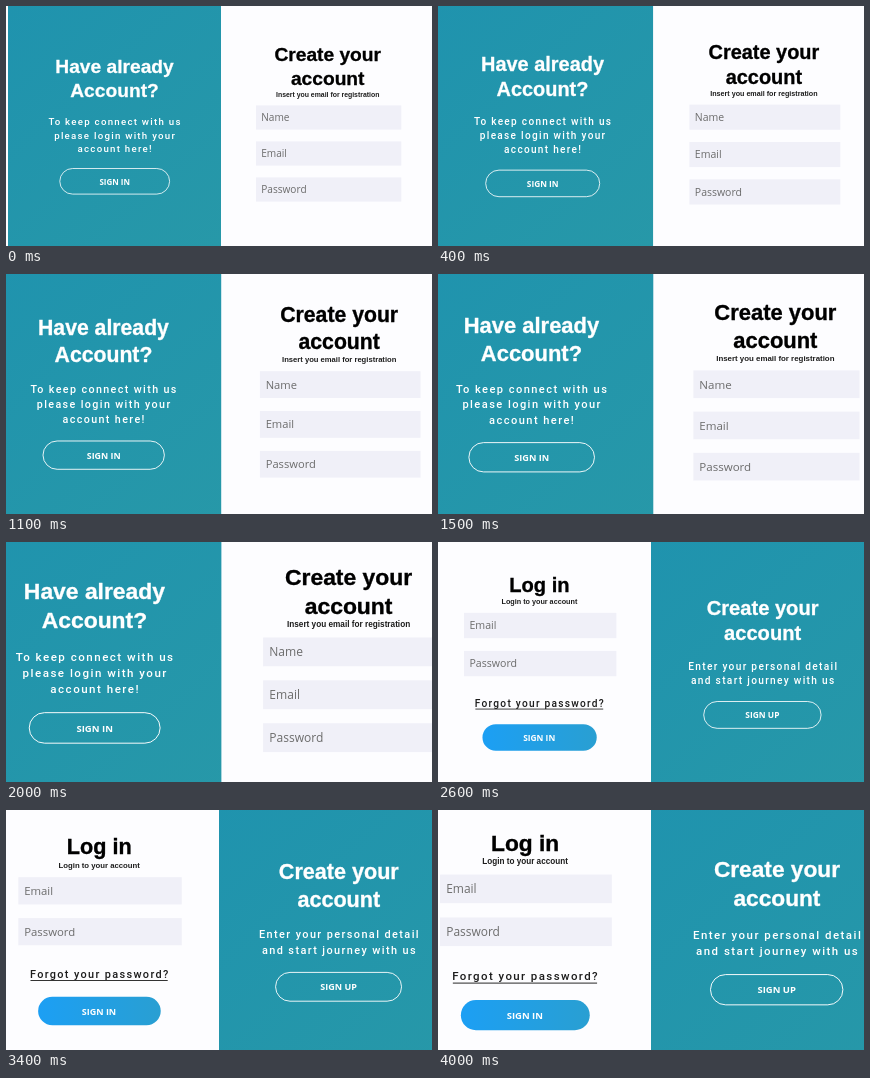
These frames come from a looping animation (426 by 240 pixels, 4.1 s). An HTML page with a canvas:

```html
<!DOCTYPE html>
<html lang="en">
<head>
<meta charset="utf-8">
<title>Login and registration</title>
<style>
  html, body { margin: 0; width: 100%; height: 100%; overflow: hidden; background: #fdfdff; }
  canvas { display: block; }
</style>
</head>
<body>
<canvas id="stage" width="426" height="240"></canvas>
<script>
const ctx = document.getElementById('stage').getContext('2d');
const W = 426, H = 240;
const LOOP = 4100, SWITCH = 2100, STEP = 100;
const ZOOM_RATE = 0.000096, CENTER_X = 213, CENTER_Y = 120;
const PAPER = '#fdfdff', FIELD = '#f0f0f8', INK = '#1c1c1c';

const HEADING = 'bold 19.2px "Liberation Sans", Arial, sans-serif';
const BODY = '500 9.7px Roboto, "Liberation Sans", sans-serif';
const NOTE = 'bold 6.9px "Liberation Sans", Arial, sans-serif';
const INPUT = '10.1px "Open Sans", sans-serif';
const BUTTON = 'bold 8px "Open Sans", sans-serif';

function text(str, x, y, font, color, align = 'center', spacing = 0) {
  ctx.font = font;
  ctx.fillStyle = color;
  ctx.textAlign = align;
  ctx.letterSpacing = spacing + 'px';
  ctx.fillText(str, x + spacing / 2, y);
}

function heading(lines, x, y, color) {
  ctx.strokeStyle = color;
  ctx.lineWidth = 0.3;
  lines.forEach((line, i) => {
    text(line, x, y + i * 24.2, HEADING, color);
    ctx.strokeText(line, x, y + i * 24.2);
  });
}

function paragraph(lines, x, y) {
  lines.forEach((line, i) => text(line, x, y + i * 13.8, BODY, '#fff', 'center', 1.25));
}

function panel(x, width) {
  const teal = ctx.createLinearGradient(x, 0, x + width, H);
  teal.addColorStop(0, '#1f93ae');
  teal.addColorStop(1, '#2798a8');
  ctx.fillStyle = teal;
  ctx.fillRect(x, 0, width, H);
}

function field(label, x, y) {
  ctx.fillStyle = FIELD;
  ctx.fillRect(x, y, 145.3, 24.2);
  text(label, x + 5.2, y + 15.8, INPUT, '#6c6c6c', 'left');
}

function pill(x, y, w, h) {
  ctx.beginPath();
  ctx.roundRect(x, y, w, h, h / 2);
}

function outlineButton(label, x, y, w) {
  pill(x, y, w, 25.6);
  ctx.strokeStyle = '#fff';
  ctx.lineWidth = 0.8;
  ctx.stroke();
  text(label, x + w / 2, y + 16, BUTTON, '#fff');
}

function drawRegister() {
  panel(2, 213);
  heading(['Have already', 'Account?'], 108.5, 67, '#fff');
  paragraph(['To keep connect with us', 'please login with your', 'account here!'], 108.5, 118.8);
  outlineButton('SIGN IN', 53.8, 162.5, 109.8);

  heading(['Create your', 'account'], 321.7, 55.2, '#000');
  text('Insert you email for registration', 321.7, 91, NOTE, INK);
  ['Name', 'Email', 'Password'].forEach((label, i) => field(label, 250, 99.4 + i * 36));
}

function drawLogin() {
  panel(213, 213);
  heading(['Log in'], 106.5, 52.8, '#000');
  text('Login to your account', 106.5, 64.5, NOTE, INK);
  field('Email', 34.6, 73.1);
  field('Password', 34.6, 109.4);

  text('Forgot your password?', 106.4, 162.7, BODY, INK, 'center', 1.2);
  ctx.fillStyle = INK;
  ctx.fillRect(45.4, 164.5, 122, 0.8);

  const blue = ctx.createLinearGradient(52, 0, 161.5, 0);
  blue.addColorStop(0, '#1c9ff4');
  blue.addColorStop(1, '#299fd2');
  pill(52.2, 179.3, 109, 25.4);
  ctx.fillStyle = blue;
  ctx.fill();
  text('SIGN IN', 106.3, 195.2, BUTTON, '#fff');

  heading(['Create your', 'account'], 319.5, 75.1, '#fff');
  paragraph(['Enter your personal detail', 'and start journey with us'], 319.5, 127.3);
  outlineButton('SIGN UP', 263.3, 157.7, 112);
}

function draw(now) {
  const t = Math.floor((now % LOOP) / STEP) * STEP;
  const isLogin = t >= SWITCH;
  const zoom = 1 + ZOOM_RATE * (isLogin ? t - SWITCH : t);

  ctx.setTransform(1, 0, 0, 1, 0, 0);
  ctx.fillStyle = PAPER;
  ctx.fillRect(0, 0, W, H);
  ctx.setTransform(zoom, 0, 0, zoom, CENTER_X * (1 - zoom), CENTER_Y * (1 - zoom));
  (isLogin ? drawLogin : drawRegister)();
}

const start = performance.now();
function tick() {
  draw(performance.now() - start);
  requestAnimationFrame(tick);
}
tick();
</script>
</body>
</html>
```
